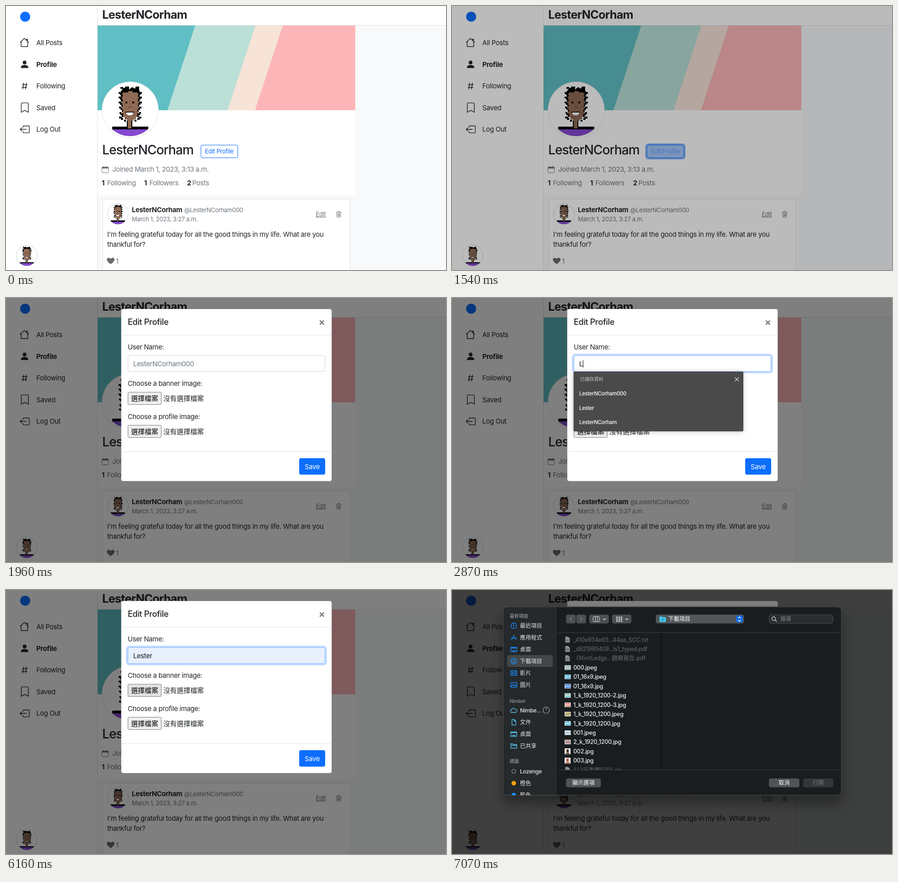
These frames come from a looping animation (965 by 580 pixels, 8000 ms). An HTML page:

```html
<!DOCTYPE html>
<html lang="zh-Hant">
<head>
<meta charset="utf-8">
<title>Edit profile</title>
<style>
  html, body { margin: 0; width: 100%; height: 100%; overflow: hidden; background: #fff; }
  svg { display: block; width: 965px; height: 580px; }
  text {
    font-family: Inter, "Noto Sans CJK TC", "Noto Sans CJK", sans-serif;
    font-optical-sizing: none;
    letter-spacing: -.022em;
    white-space: pre;
  }
  text.cjk { font-family: "Noto Sans CJK TC", "Noto Sans CJK", Inter, sans-serif; letter-spacing: 0; }
  #list { filter: drop-shadow(0 1px 6px rgba(0, 0, 0, .22)); }
  #dialog { filter: drop-shadow(0 17px 13px rgba(0, 0, 0, .35)); }
</style>
</head>
<body>
<svg id="stage" viewBox="0 0 965 580" xmlns="http://www.w3.org/2000/svg"></svg>
<script>
const LOOP = 8000, TICK = 70;
const FIRST = 'Lester', NAME = 'LesterNCorham', HANDLE = NAME + '000';
const INK = '#212529', GREY = '#6c757d', LINE = '#dee2e6', BLUE = '#0d6efd';

// Markup helpers
const text = (x, y, s, { size = 14.8, fill = INK, weight = 400, more = '' } = {}) => {
  const cjk = /[\u4e00-\u9fff]/.test(s) ? 'class="cjk"' : '';
  return `<text x="${x}" y="${y}" font-size="${size}" fill="${fill}" font-weight="${weight}" ${cjk} ${more}>${s}</text>`;
};
const rect = (x, y, w, h, fill, r = 0, more = '') =>
  `<rect x="${x}" y="${y}" width="${w}" height="${h}" rx="${r}" fill="${fill}" ${more}/>`;
const box = (x, y, w, h, fill, stroke, r, more = '') =>
  rect(x + .5, y + .5, w - 1, h - 1, fill, r, `stroke="${stroke}" ${more}`);
const line = (d, stroke, w = 1, more = '') =>
  `<path d="${d}" fill="none" stroke="${stroke}" stroke-width="${w}" ${more}/>`;
const disc = (x, y, r, fill, more = '') => `<circle cx="${x}" cy="${y}" r="${r}" fill="${fill}" ${more}/>`;
const at = (x, y, s, body) => `<g transform="translate(${x} ${y}) scale(${s})">${body}</g>`;

function avatarDefs() {
  const skin = '#8f6a54';
  const crown = 'M-21-48h6M-11-49h9M2-47h6M12-49h8M-16-46h14M0-45h20M-18-43h38M-20-40h16M6-40h15';
  const strands = 'M-25-37h9M-22-34h4M-20-31h4M-25-27h7M-22-24h5M-20-20h4M-25-16h6M-22-13h5M-19-9h3' +
    'M-24-5h5M-21-2h4M-18 2h3M-23 7h4M-21 10h6M-18 14h3M-24 17h6M-20 20h5M-13 24h4';
  const side = line(strands, '#000', 3.6);
  return `<defs>
    <clipPath id="round"><circle r="58"/></clipPath>
    <g id="face" clip-path="url(#round)" shape-rendering="crispEdges">
      <path d="M-18-42H19V8h-2v8h-4v5h-5v3H-7v-3h-5v-5h-4V8h-2z" fill="${skin}"/>
      ${line(crown, '#000', 3.8)}${side}<g transform="translate(1) scale(-1 1)">${side}</g>
      ${rect(-39, 37, 79, 7, '#000')}${rect(-37, 43, 75, 17, '#8548cf')}
      ${rect(-6, 20, 10, 21, skin)}${line('M-6 24v18h10v-18', '#000', 2)}
      ${rect(-10, -18, 4, 4, '#000')}${rect(5, -18, 4, 4, '#000')}
      ${rect(-3, -7, 6, 3, '#6f5040')}${rect(-10, 4, 19, 3, '#2a1c16')}${rect(-8, 6, 15, 4, '#fff')}${rect(-5, 10, 9, 2, '#fff')}
    </g></defs>`;
}
const smallAvatar = (x, y) => disc(x, y, 22.8, '#fff', 'stroke="#ced4da"') + at(x, y, .385, '<use href="#face"/>');

function sidebar() {
  const rows = [
    ['All Posts', 70, 1.3, line('M.7 7.8 8 .8l7.3 7M2.5 6.5v8.3h11V6.5M11.7 4V2h1.6v3.8', INK, 1.1, 'stroke-linejoin="round"')],
    ['Profile', 117.4, 1.35, disc(8, 5, 3, INK) + `<path d="M3 14s-1 0-1-1 1-4 6-4 6 3 6 4-1 1-1 1z" fill="${INK}"/>`],
    ['Following', 164.6, 1.35, line('M6.6 3 4.9 13.6M11.1 3 9.4 13.6M4.1 6h8.6M3.4 10.5H12', INK, 1.1)],
    ['Saved', 212, 1.4, line('M2.5 2A1.5 1.5 0 0 1 4 .6h8A1.5 1.5 0 0 1 13.5 2v13.3L8 12.4l-5.5 2.9z', INK, 1)],
    ['Log Out', 260, 1.38, line('M5.5 5V3.3a.8.8 0 0 1 .8-.8h8.2a.8.8 0 0 1 .8.8v9.4a.8.8 0 0 1-.8.8H6.3a.8.8 0 0 1-.8-.8V11M11 8H.8M3.8 5l-3 3 3 3', INK, 1)],
  ];
  return rect(0, 0, 200, 580, '#fff') + rect(200, 0, 1, 580, LINE) + disc(42, 23.5, 11, BLUE) +
    rows.map(([s, y, k, icon], i) => at(30, y, k, icon) +
      text(66.5, 86 + i * 47.6, s, { weight: s === 'Profile' ? 700 : 400 })).join('') +
    smallAvatar(45.5, 548.5);
}

function profile() {
  const grey = { fill: GREY }, small = { fill: GREY, size: 13 };
  const stripe = (x, fill) => `<path d="M${x} 43H766V229H${x - 61}z" fill="${fill}"/>`;
  const count = (x, n, s) => text(x, 394, n, { weight: 700 }) + text(x + 11.5, 394, s, grey);
  const author = `${NAME}<tspan dx="4.5" font-size="13" font-weight="400" fill="${GREY}">@${HANDLE}</tspan>`;
  return rect(201, 0, 764, 42, '#fff') + rect(201, 42, 764, 1, LINE) +
    text(211, 27.7, NAME, { size: 25.3, weight: 700, more: 'style="letter-spacing:-.03em"' }) +
    rect(201, 43, 565, 372, '#fff') + rect(201, 43, 565, 186, '#60bfc4') +
    stripe(415, '#bbe0d8') + stripe(547, '#f7e3d8') + stripe(607, '#fdb6b8') +
    disc(272.5, 228.5, 62, '#fff', `stroke="${LINE}"`) + at(272, 228, 1, '<use href="#face"/>') +
    text(211, 326, NAME, { size: 28.2, weight: 500, more: 'style="letter-spacing:-.036em"' }) +
    '<g id="edit"></g>' +
    box(210, 353, 15, 14, 'none', GREY, 1.8) + rect(210, 354, 15, 3, GREY) + rect(213, 351.5, 1, 3, GREY) + rect(221, 351.5, 1, 3, GREY) +
    text(233, 364, 'Joined March 1, 2023, 3:13 a.m.', grey) +
    count(210, '1', 'Following') + count(303, '1', 'Followers') + count(397, '2', 'Posts') +
    box(212, 424, 543, 200, '#fff', LINE, 4) + smallAvatar(245.5, 457) +
    text(276, 453, author, { weight: 700 }) +
    text(276, 473, 'March 1, 2023, 3:27 a.m.', small) +
    text(679.5, 462, 'Edit', { ...small, more: 'text-decoration="underline"' }) +
    line('M724 453.2h11.5M727.8 453v-1.5h4V453M725.2 453.5l.7 10.4h7.7l.7-10.4M727.9 455.5l.2 6.5M729.8 455.5v6.5M731.7 455.5l-.2 6.5', GREY) +
    text(222, 506.5, "I'm feeling grateful today for all the good things in my life. What are you") +
    text(222, 529, 'thankful for?') +
    '<path d="M229.7 567c-16-10.5-5-17.5 0-11.5 5-6 16 1 0 11.5z" fill="#6a6a6a"/>' +
    text(241, 566, '1', grey);
}

function fileInput(y, label, id) {
  return text(267, y, label) + box(267, y + 13.5, 74, 28, '#efefef', '#767676', 2, `id="${id}"`) +
    text(274.5, y + 33, '選擇檔案', { fill: '#000' }) + text(345, y + 33, '沒有選擇檔案');
}

function modal() {
  return box(252, 23.5, 463, 379.5, '#fff', 'rgba(0,0,0,.2)', 4.5) +
    text(267, 59, 'Edit Profile', { size: 18.2, weight: 500 }) +
    line('M688.3 49.5l9 9m0-9l-9 9', '#7f7f7f', 2.6) +
    rect(252.5, 81, 462, 1, LINE) + text(267, 113, 'User Name:') +
    rect(265, 124.5, 437, 39, 'none', 5.5, `id="ring" stroke="${BLUE}" stroke-width="4"`) +
    box(267, 126, 433, 36, '#fff', '#ced4da', 3.7, 'id="field"') +
    '<text id="typed" x="279" y="149.5" font-size="14.8"></text>' +
    rect(0, 137, 1, 16, '#000', 0, 'id="caret"') +
    fileInput(193, 'Choose a banner image:', 'banner') + fileInput(265.5, 'Choose a profile image:', 'portrait') +
    rect(252.5, 337, 462, 1, LINE) + rect(643, 352, 57, 36, BLUE, 4) +
    text(671.5, 375.5, 'Save', { fill: '#fff', more: 'text-anchor="middle"' });
}

function savedList(count, active) {
  const names = [HANDLE, FIRST, NAME, 'user01', 'tester', 'guest2'].slice(0, count);
  return rect(266.5, 161.5, 372.5, 37 + count * 31.5, '#4a4a4a', 3) +
    (active < 0 ? '' : rect(270, 195 + active * 31.5, 357, 31, '#646464', 3)) +
    text(281, 182, '已儲存資料', { size: 10.2, fill: '#c4c4c4' }) +
    line('M620.5 174.5l8.5 8.5m0-8.5l-8.5 8.5', '#ddd', 1.2) +
    names.map((s, i) => text(279, 214 + i * 31.5, s, { size: 11.3, weight: 500, fill: '#fff' })).join('');
}

// Sidebar icons of the file dialog, drawn around their centre
const RING = 'M0-6a6 6 0 1 0 .01 0z';
const ICON = {
  clock: RING + 'M0-3.5V0H-2.5',
  apps: 'M-5 5 1-5M5 5-1-5M-6.5 1.5H6.5',
  desk: 'M-6.5-4.5h13v9.5h-13zM-6.5-3h13M-4 3h8',
  down: RING + 'M0-3v6M-2.5.8 0 3 2.5.8',
  film: 'M-6.5-5h13V5h-13zM-3.5-5V5M3.5-5V5M-3.5 0h7',
  pic: 'M-6.5-5h13V5h-13zM-6 4-2-1 1 2 3 0l3 3',
  cloud: 'M-4 4.5a3 3 0 0 1-.5-6 4 4 0 0 1 7.5-1 3.4 3.4 0 0 1 1 7z',
  doc: 'M-4-6h5l3.5 3.5V6h-8.5zM1-6v3.5h3.5',
  shared: 'M-6.5-4.5h4L-1-3h7.5v8h-13zM-6.5-1h13',
};

function dialogSide() {
  const label = (y, s) => text(149, y + 4.4, s, { size: 12.2, fill: '#e6e8e9', weight: 500 });
  const item = (y, icon, s, hue) => at(135.5, y, 1, line(ICON[icon], hue, 1.3)) + label(y, s);
  const head = (y, s) => text(126.5, y + 3.8, s, { size: 10.2, fill: '#85898c', weight: 600 });
  const tag = (y, s, r, fill, more) => disc(135.5, y, r, fill, more) + label(y, s);
  const places = [['clock', '最近項目'], ['apps', '應用程式'], ['desk', '桌面'], ['down', '下載項目'], ['film', '影片'], ['pic', '圖片']];
  const cloud = [['cloud', 'Nimbe...'], ['doc', '文件'], ['desk', '桌面'], ['shared', '已共享']];
  return rect(121, 143, 100, 26, '#43474a', 5) + head(57, '喜好項目') +
    places.map(([k, s], i) => item(78.5 + i * 26, k, s, '#1a8cff')).join('') +
    head(244, 'Nimbet') + cloud.map(([k, s], i) => item(264.5 + i * 26, k, s, '#55c3ee')).join('') +
    disc(206.5, 264, 7, 'none', 'stroke="#a5a8aa" stroke-width="1.2"') + line('M206.5 257v7', '#a5a8aa', 1.2) +
    head(376.5, '標籤') + tag(398.5, 'Lozenge', 4.3, 'none', 'stroke="#9a9da0" stroke-width="1.2"') +
    tag(424.5, '橙色', 5, '#ff9f0a') + tag(450.5, '藍色', 5, '#1a8cff');
}

function dialogBar() {
  const key = (x, w, fill = '#4b4f51') => rect(x, 54, w, 19.5, fill, 4.5);
  const down = x => line(`M${x} 62.5l3 3 3-3`, '#dcdedf', 1.4);
  let grid = '';
  for (let i = 0; i < 9; i++) grid += rect(360 + (i % 3) * 5, 58.5 + Math.floor(i / 3) * 4.2, 3.6, 2.8, '#d0d2d3', .5);
  return key(250, 21.5) + key(272.5, 21.5) + line('M263.5 59.5l-5 4.5 5 4.5M281 59.5l5 4.5-5 4.5', '#85898b', 1.4) +
    key(301, 43) + box(309, 58, 15, 12, 'none', '#dcdedf', 1) + line('M314.5 58v12M319 58v12', '#dcdedf') + down(331.5) +
    key(351, 42.5) + grid + down(380.5) +
    key(447, 193, '#525658') + rect(455, 58, 6, 4, '#36b3dd', 1) + rect(455, 59.5, 14, 11, '#45c3ea', 1.5) +
    line('M462 62.5v4.5m-2-2 2 2 2-2', '#1c7fa5', 1.2) +
    text(474, 68, '下載項目', { size: 12.2, fill: '#fff', weight: 500 }) +
    rect(623, 56, 15, 15.5, '#1769e0', 4) + line('M627.5 62l3-3 3 3M627.5 66l3 3 3-3', '#fff', 1.4) +
    box(695, 54, 141, 20, '#2a2e30', '#484c4e', 4.5) + disc(705.5, 63, 4, 'none', 'stroke="#d5d7d8" stroke-width="1.3"') +
    line('M708.5 66l4 4', '#d5d7d8', 1.4) + text(720, 68.3, '搜尋', { size: 12, fill: '#85898b' });
}

function dialogFiles() {
  const files = [
    ['_410e934e65...44aa_SCC.txt'], ['_d921995409...is1_typed.pdf'], ['《MintLedge...觀察報告.pdf'],
    ['000.jpeg', '#7cc8c8', '#f6b5b5'], ['01_16x9.jpeg', '#38aee0', '#e8f4fa'], ['01_16x9.jpg', '#2d7de0', '#e7ddf0'],
    ['1_k_1920_1200-2.jpg', '#66c9cc', '#f2dcc8'], ['1_k_1920_1200-3.jpg', '#d98a70', '#f4d9c8'],
    ['1_k_1920_1200.jpeg', '#f0b64a', '#4fa9d8'], ['1_k_1920_1200.jpg', '#49b8e0', '#eaf6fa'],
    ['001.jpeg', '#dfeaf2', '#8fb1cc'], ['2_k_1920_1200.jpg', '#e08a78', '#6aa9d6'],
    ['002.jpg', '#4a3428'], ['003.jpg', '#b5553f'], ['111行事曆0701.xls'],
  ];
  const page = y => `<path d="M248.5 ${y - 6.5}h6l4 4v9h-10z" fill="#8e9294"/>` + line(`M250.5 ${y}h6m-6 2.5h6`, '#44484a');
  const wide = (y, a, b) => rect(247, y - 5, 13.5, 10, '#eef2f4') + rect(248, y - 4, 11.5, 8, a) + line(`M248 ${y + 2}l4-3 3 2 4.5-3`, b, 2);
  const face = (y, a) => rect(247, y - 6.5, 13, 13, '#f4f4f4') + rect(251, y - 4.5, 5, 7, a, 1) + rect(249.5, y + 3.5, 8, 2.5, a);
  return files.map(([s, a, b], i) => {
    const y = 109 + i * 20.45;
    return (b ? wide(y, a, b) : a ? face(y, a) : page(y)) +
      text(266, y + 4.5, s, { size: 12.6, fill: a ? '#eceeef' : '#686c6e', weight: a ? 500 : 400 });
  }).join('');
}

function dialog() {
  const key = (x, w, s, fill, ink) => rect(x, 414, w, 19.5, fill, 4.5) +
    text(x + w / 2, 428, s, { size: 12.2, fill: ink, weight: 500, more: 'text-anchor="middle"' });
  return `<defs><clipPath id="panel">${rect(111.5, 36.5, 743, 415, '#000', 9.5)}</clipPath>
    <clipPath id="rows">${rect(232, 94, 227, 301, '#000')}</clipPath></defs>
    <g clip-path="url(#panel)">` +
    rect(111, 36, 744, 416, '#191d1f') + rect(111, 36, 120, 416, '#25292b') + rect(231, 36, 1, 416, '#0c0e0f') +
    dialogSide() + rect(232, 93, 623, 1, '#3b3f41') + dialogBar() +
    `<g clip-path="url(#rows)">${dialogFiles()}</g>` +
    rect(458.5, 94, 1, 301, '#050606') + rect(232, 395, 623, 1, '#3b3f41') +
    key(250, 76.5, '顯示選項', '#505456', '#fff') + key(695, 67, '取消', '#505456', '#fff') + key(770, 66.5, '打開', '#333739', '#777b7d') +
    '</g>' + box(111.5, 36.5, 743, 415, 'none', '#55595b', 9);
}

const $ = id => document.getElementById(id);
$('stage').innerHTML = avatarDefs() + rect(0, 0, 965, 580, '#f8f9fa') + profile() + sidebar() +
  rect(0, 0, 965, 580, '#000', 0, 'id="shade"') +
  `<g id="modal">${modal()}</g><g id="list"></g>` +
  rect(0, 0, 965, 580, '#000', 0, 'id="dim"') + `<g id="dialog">${dialog()}</g>`;

// Motion
const KEYS = [2870, 3150, 3500, 4060, 4270, 4410];
const ramp = (t, start, len) => Math.min(1, Math.max(0, (t - start) / len));
const within = (t, a, b) => t >= a && t < b;
const mix = (a, b, k) => `rgb(${a.map((v, i) => Math.round(v + (b[i] - v) * k))})`;
const set = (id, attrs) => { for (const k in attrs) $(id).setAttribute(k, attrs[k]); };
const slow = k => 1 - (1 - k) ** 1.65;

function editButton(t) {
  const hot = ramp(t, 1000, 150) - ramp(t, 1445, 150), ring = ramp(t, 1360, 150);
  const blue = [13, 110, 253], white = [255, 255, 255];
  return rect(425.5, 303.5, 85, 32, 'none', 5, `stroke="${BLUE}" stroke-width="3" opacity="${ring * .5}"`) +
    box(427, 305, 82, 29, mix(white, blue, hot), BLUE, 3.5) +
    text(467.7, 324, 'Edit Profile', { size: 13, fill: mix(blue, white, hot), more: 'text-anchor="middle"' });
}

function field(t) {
  const typed = KEYS.filter(k => t >= k).length, filled = t >= 4900;
  const value = !typed ? HANDLE : !filled ? FIRST.slice(0, typed) : t < 5180 ? HANDLE : FIRST;
  const focus = ramp(t, 2270, 150);
  $('typed').textContent = value;
  set('typed', { fill: typed ? '#16191c' : GREY });
  set('field', { fill: filled ? '#e8f0fe' : '#fff', stroke: mix([206, 212, 218], [134, 183, 254], focus) });
  set('ring', { opacity: focus * .25 });
  const end = typed ? $('typed').getComputedTextLength() : 0;
  set('caret', { x: 279 + Math.round(end), opacity: within(t, 2380, 4900) || within(t, 5600, 5950) ? 1 : 0 });
}

function render(t) {
  $('edit').innerHTML = editButton(t);
  set('shade', { opacity: ramp(t, 1460, 150) * .5 });
  set('modal', { opacity: ramp(t, 1630, 150), transform: `translate(0 ${-46.3 * (1 - slow(ramp(t, 1630, 300)))})` });
  field(t);
  const active = within(t, 4900, 5180) ? 0 : t >= 5180 ? 1 : -1;
  $('list').innerHTML = within(t, 2380, 5600) ? savedList(t < 2870 ? 6 : 3, active) : '';
  set('banner', { fill: t >= 6160 ? '#e3e3e3' : '#efefef' });
  set('dim', { opacity: ramp(t, 6470, 350) * .5 });
  const open = ramp(t, 6650, 400), scale = .86 + .14 * slow(open);
  set('dialog', { opacity: open, transform: `translate(483 244) scale(${scale}) translate(-483 -244)` });
}

function frame() {
  const t = performance.now() % LOOP;
  render(t - t % TICK);
  requestAnimationFrame(frame);
}
frame();
</script>
</body>
</html>
```
